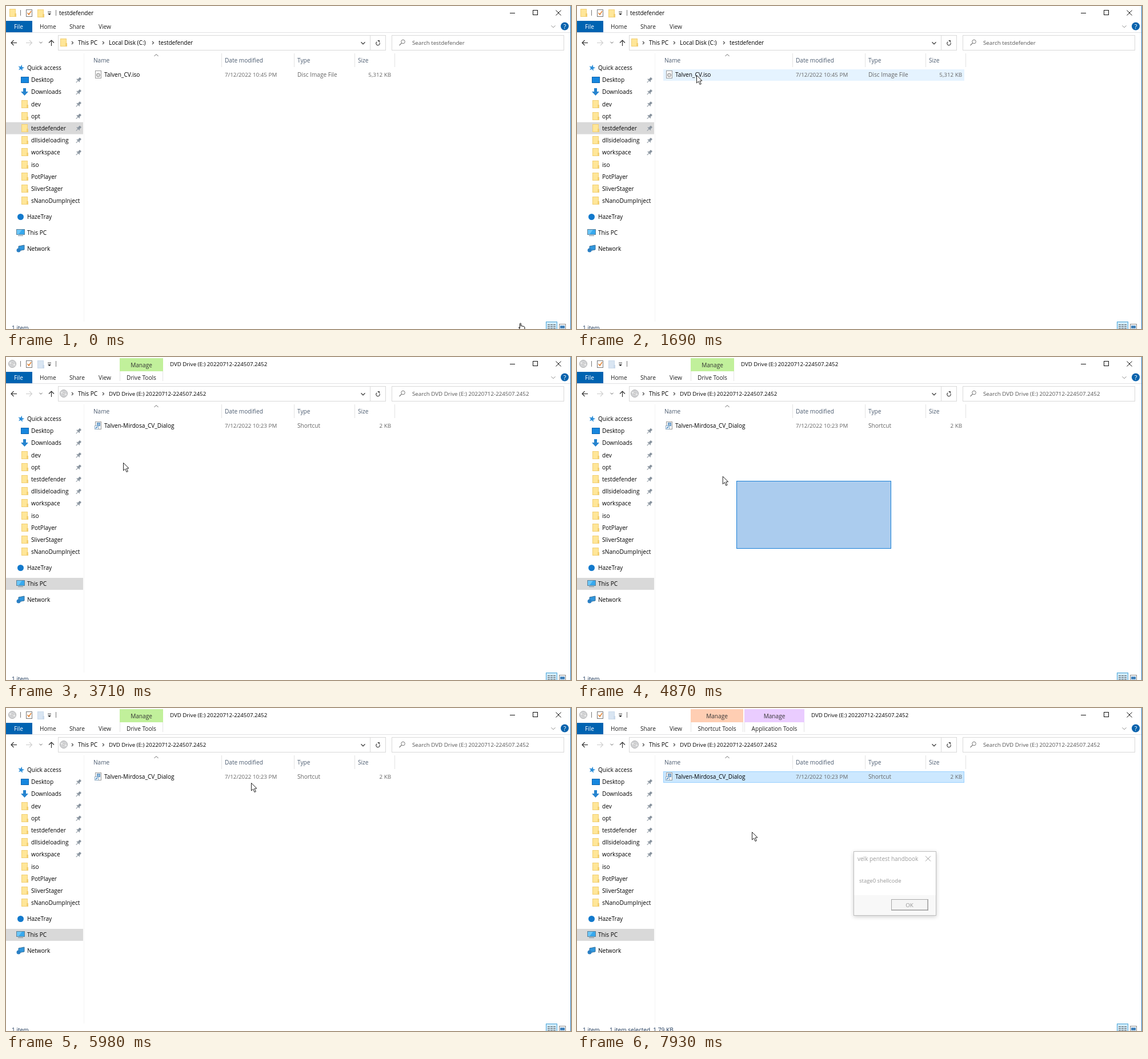
An HTML page with a canvas that plays this animation: 989 by 566 pixels, repeating every 8 s.

```html
<!DOCTYPE html>
<html lang="en">
<head>
<meta charset="utf-8">
<title>File explorer</title>
<style>
  html, body { margin: 0; width: 100%; height: 100%; overflow: hidden; background: #fff; }
  canvas { display: block; }
</style>
</head>
<body>
<canvas id="stage" width="989" height="566"></canvas>
<script>
const ctx = document.getElementById('stage').getContext('2d');
const LOOP = 8000;
const FONT = '"Open Sans", "Noto Sans", sans-serif';

// Pointer path: time, x, y
const path = [
  [0, 897, 555], [70, 897, 555], [250, 675, 378], [390, 675, 378], [540, 606, 241],
  [600, 603, 259], [760, 430, 370], [940, 316, 429], [1010, 288, 434], [1080, 276, 400],
  [1150, 280, 300], [1220, 280, 300], [1690, 209, 121], [2170, 212, 125], [2360, 212, 125],
  [2500, 216, 168], [2560, 216, 168], [2700, 208, 133], [2900, 208, 122], [3300, 208, 122],
  [3710, 205, 185], [4240, 205, 185], [4400, 569, 380], [4470, 550, 336], [4620, 385, 262],
  [4800, 279, 217], [4870, 255, 209], [5010, 214, 166], [5080, 214, 166], [5200, 185, 150],
  [5500, 585, 352], [5840, 450, 150], [5980, 429, 131], [6120, 424, 126], [6450, 424, 126],
  [6600, 340, 119], [6790, 251, 122], [7650, 251, 122], [7930, 306, 217], [8000, 306, 217]
];
const drags = [
  { from: 600, to: 1080, x: 603, y: 259 },
  { from: 4470, to: 4940, x: 550, y: 336 }
];
const within = (t, a, b) => t >= a && t < b;

function pointerAt(t) {
  const i = Math.max(1, path.findIndex(k => k[0] > t));
  const [t0, x0, y0] = path[i - 1], [t1, x1, y1] = path[i];
  const f = (t - t0) / (t1 - t0);
  return [x0 + (x1 - x0) * f, y0 + (y1 - y0) * f];
}

function text(s, x, y, color = '#000', size = 10.1, align = 'left') {
  ctx.font = `${size}px ${FONT}`;
  ctx.textAlign = align;
  ctx.fillStyle = color;
  ctx.fillText(s, x, y);
}
function rect(x, y, w, h, fill, stroke) {
  if (fill) { ctx.fillStyle = fill; ctx.fillRect(x, y, w, h); }
  if (stroke) {
    ctx.strokeStyle = stroke;
    ctx.lineWidth = 1;
    ctx.strokeRect(x + .5, y + .5, w - 1, h - 1);
  }
}
function line(points, color = '#444', width = 1) {
  ctx.beginPath();
  for (let i = 0; i < points.length; i += 2) ctx.lineTo(points[i], points[i + 1]);
  ctx.strokeStyle = color;
  ctx.lineWidth = width;
  ctx.stroke();
}
function poly(points, fill, stroke) {
  const p = new Path2D('M' + points + 'Z');
  ctx.fillStyle = fill;
  ctx.fill(p);
  if (stroke) { ctx.strokeStyle = stroke; ctx.lineWidth = 1; ctx.stroke(p); }
}
function circle(x, y, r, fill, stroke) {
  ctx.beginPath();
  ctx.arc(x, y, r, 0, 7);
  ctx.fillStyle = fill;
  ctx.fill();
  if (stroke) { ctx.strokeStyle = stroke; ctx.lineWidth = 1; ctx.stroke(); }
}
const down = (x, y, r, c, w) => line([x - r, y - r / 2, x, y + r / 2, x + r, y - r / 2], c, w);
const right = (x, y) => line([x - 1, y - 2.5, x + 1.5, y, x - 1, y + 2.5], '#444', 1.1);

function folder(x, y, pale) {
  const edge = pale ? '#c9d9ea' : '#f2cf73';
  rect(x, y, 11, 14, pale ? '#d9e5f2' : '#ffe698', edge);
  rect(x + 9, y + 8, 3, 6, edge);
}
function disc(x, y) {
  circle(x, y, 6.5, '#d2d3d5', '#b0b1b3');
  line([x - 5, y - 2, x + 5, y + 2], '#ececec', 2);
  circle(x, y, 1.5, '#f8f8f8', '#bbb');
}
function monitor(x, y) {
  rect(x, y, 15, 10, '#38a9ee', '#5b7f98');
  poly(`${x + 1} ${y + 1}h9l-6 8h-3`, '#6cc6f7');
  rect(x + 3, y + 11, 9, 1, '#6b8ba0');
}
function pin(x, y) {
  ctx.save();
  ctx.translate(x, y);
  ctx.rotate(Math.PI / 4);
  rect(-2, -5, 4, 5, '#87929d');
  rect(-3.5, 0, 7, 1.5, '#87929d');
  rect(-.5, 1, 1, 5, '#87929d');
  ctx.restore();
}
function star(x, y) {
  ctx.beginPath();
  for (let i = 0; i < 10; i++) {
    const r = i % 2 ? 2.4 : 5.8, a = i * Math.PI / 5 - 1.35;
    ctx.lineTo(x + r * Math.cos(a), y + r * Math.sin(a));
  }
  ctx.fillStyle = '#2d8fd9';
  ctx.fill();
}

function drawTitleBar(drive, tabs) {
  if (drive) disc(11, 12); else folder(6, 5);
  rect(25, 7, 1, 10, '#777');
  rect(35, 6, 11, 13, '#fff', '#777');
  line([37.5, 12, 40, 15, 44, 9], '#e07b28', 1.4);
  folder(55, 6, drive);
  rect(73, 10, 6, 1, '#333');
  poly('73 13L79 13L76 16', '#222');
  rect(87, 7, 1, 10, '#777');

  let x = 199;
  for (const [label, width, color] of tabs) {
    rect(x, 2, width, 23, color);
    line([x + .5, 25, x + .5, 42], '#e3e3e3');
    line([x + width - .5, 25, x + width - .5, 42], '#e3e3e3');
    text('Manage', x + width / 2, 18, '#333', 10.1, 'center');
    text(label, x + width / 2, 40, '#222', 10.1, 'center');
    x += width + 2;
  }
  const title = drive ? 'DVD Drive (E:) 20220712-224507.2452' : 'testdefender';
  text(title, tabs.length ? x + 10 : 93, 16, '#000', drive ? 9.7 : 10);

  rect(882, 12, 9, 1, '#111');
  rect(922, 7, 9, 9, null, '#111');
  line([962.5, 7.5, 971.5, 16.5], '#111');
  line([971.5, 7.5, 962.5, 16.5], '#111');

  rect(0, 46, 988, 1, '#e1e2e3');
  rect(0, 26, 46, 20, '#0063b1');
  text('File', 14, 40, '#fff');
  text('Home', 59, 40, '#222');
  text('Share', 111, 40, '#222');
  text('View', 162, 40, '#222');
  down(958, 36, 3.5, '#888');
  circle(978, 35.5, 7, '#0863ad');
  text('?', 978, 39.5, '#fff', 11, 'center');
}

function drawAddressBar(drive) {
  line([19, 64.5, 9.5, 64.5], '#333', 1.2);
  line([13.5, 60, 9, 64.5, 13.5, 69], '#333', 1.2);
  line([35, 64.5, 45, 64.5], '#d0d0d0', 1.2);
  line([41, 60, 45.5, 64.5, 41, 69], '#d0d0d0', 1.2);
  down(61, 64, 2.5, '#666');
  line([79.5, 70, 79.5, 60], '#333', 1.2);
  line([75, 64.5, 79.5, 60, 84, 64.5], '#333', 1.2);

  rect(91, 51, 574, 27, '#fff', '#d9d9d9');
  rect(637, 51, 1, 27, '#d9d9d9');
  if (drive) disc(101, 64); else folder(95, 57);
  right(116, 64.5);
  text('This PC', 126, 68);
  right(170, 64.5);
  if (drive) {
    text('DVD Drive (E:) 20220712-224507.2452', 180, 68, '#000', 9.7);
  } else {
    text('Local Disk (C:)', 180, 68);
    right(257, 64.5);
    text('testdefender', 267, 68, '#000', 10);
  }
  down(625, 65, 3.5, '#444', 1.3);
  ctx.beginPath();
  ctx.arc(651, 65.5, 3.2, -.4, 4.2);
  ctx.strokeStyle = '#444';
  ctx.lineWidth = 1.1;
  ctx.stroke();
  poly('650 60L654 60L654 64', '#444');

  rect(675, 51, 302, 27, '#fff', '#d9d9d9');
  circle(695, 62.5, 3.3, '#fff', '#777');
  line([692.5, 65, 688.5, 69], '#777', 1.1);
  text('Search ' + (drive ? 'DVD Drive (E:) 20220712-224507.2452' : 'testdefender'), 711, 68, '#555', 9.75);
}

function drawSidebar(drive) {
  rect(136, 83, 1, 470, '#f4f4f4');
  rect(0, drive ? 387 : 203.6, 135, 21, '#d9d9d9');
  star(26.5, 108.5);
  text('Quick access', 37, 112);
  const items = ['Desktop', 'Downloads', 'dev', 'opt', 'testdefender', 'dllsideloading',
    'workspace', 'iso', 'PotPlayer', 'SliverStager', 'sNanoDumpInject'];
  items.forEach((name, i) => {
    const y = 129.3 + i * 21.18, top = Math.round(y - 7);
    if (i === 0) rect(26, 124, 14, 11, '#1787df', '#0b62ad');
    else if (i === 1) poly('30 144L35 144L35 150L39 150L32.5 157L26 150L30 150', '#2684cf');
    else folder(27, top);
    text(name, 44, Math.round(y + 4), '#000', 10.15);
    if (i < 7) pin(127, y + .5);
  });
  circle(25.5, 369.5, 5.5, '#1279cc');
  text('HazeTray', 37, 373);
  monitor(18, 391);
  text('This PC', 37, 401);
  poly('22 421L32 419L32 427L22 429', '#2f96dd', '#3c7299');
  circle(22, 428, 3.5, '#2b7fc4');
  text('Network', 37, 429);
}

function drawFiles(drive, state) {
  const head = '#4c5c70';
  text('Name', 153, 99, head);
  text('Date modified', 383, 99, head);
  text('Type', 510, 99, head);
  text('Size', 616, 99, head);
  line([259.5, 88, 263, 84.5, 266.5, 88], '#666');
  for (const x of [377, 504, 610, 680]) rect(x, 83, 1, 24, '#e3e3e3');

  if (state === 'hover') rect(151, 111, 527, 20, '#e5f3ff');
  if (state === 'focus') rect(151, 111, 527, 20, '#fff', '#99c9ef');
  if (state === 'selected') rect(151, 111, 527, 20, '#cce8ff', '#99d1ff');

  rect(156, 113, 11, 14, '#fafafa', '#9a9a9a');
  if (drive) {
    rect(159, 115, 6, 6, '#8db6da', '#5c90bf');
    rect(155, 120, 7, 7, '#fff', '#8aa9c2');
    line([157, 125, 160, 122], '#1e6fb8', 1.3);
  } else circle(161.5, 121, 3, '#ddd', '#888');

  const dim = '#666';
  text(drive ? 'Talven-Mirdosa_CV_Dialog' : 'Talven_CV.iso', 172, 124);
  text(drive ? '7/12/2022 10:23 PM' : '7/12/2022 10:45 PM', 383, 124, dim, 9.8);
  text(drive ? 'Shortcut' : 'Disc Image File', 510, 124, dim);
  text(drive ? '2 KB' : '5,312 KB', 674, 124, dim, 9.8, 'right');
}

function drawStatus(drive, selected) {
  text('1 item', 10, 568, '#1e395b');
  if (selected) text('1 item selected  ' + (drive ? '1.79 KB' : '5.18 MB'), 57, 568, '#1e395b');
  rect(945, 553, 20, 16, '#cfeafa', '#4aa5d8');
  for (let y = 558; y < 566; y += 3)
    for (const x of [948, 953, 958]) rect(x, y, 4, 1, '#555');
  rect(968, 557, 12, 12, '#fff', '#888');
  rect(970, 560, 8, 5, '#4584bc');
}

function drawDialog(alpha) {
  ctx.save();
  ctx.shadowColor = `rgba(0,0,0,${alpha * .4})`;
  ctx.shadowBlur = 7;
  ctx.shadowOffsetY = 2;
  rect(484, 251, 145, 113, '#fff');
  ctx.shadowColor = 'transparent';
  ctx.globalAlpha = alpha;
  rect(484, 251, 145, 113, null, '#777');
  rect(485, 328, 143, 35, '#f0f0f0');
  text('velk pentest handbook', 491, 268, '#333', 10);
  line([610, 259.5, 619, 268.5], '#333');
  line([619, 259.5, 610, 268.5], '#333');
  text('stage0 shellcode', 494, 306, '#222', 9.5);
  rect(550, 335, 65, 20, '#f0f0f0', '#555');
  rect(551, 353, 63, 1, '#777');
  rect(613, 336, 1, 18, '#777');
  text('OK', 582, 348.5, '#333', 9.8, 'center');
  ctx.restore();
}

function drawPointer(t) {
  const [x, y] = pointerAt(t);
  ctx.save();
  ctx.translate(x, y);
  if (t < 70) {
    poly('2.5 1.5Q3.5 0 4.5 1.5L4.5 5.5L9.5 6.5Q11.5 7 11 10L10 14L5 14L.5 8.5L2.5 9', '#fff', '#000');
  } else {
    poly('.5 .5L.5 14L3.7 11L6 16.5L8.3 15.5L6 10.2L10 10', '#fff', '#222');
  }
  ctx.restore();
}

function render(t) {
  const drive = t >= 3370;
  const selected = within(t, 1830, 2500) || within(t, 2970, 3370) || t >= 6120;
  const hover = within(t, 1620, 1830) || within(t, 2800, 2970) || within(t, 6050, 6120);
  const state = selected ? 'selected' : hover ? 'hover' : within(t, 2500, 2800) ? 'focus' : '';
  const purple = '#eaccff';
  const tabs = !drive ? (selected ? [['Disc Image Tools', 103, purple]] : [])
    : selected ? [['Shortcut Tools', 92, '#ffceb3'], ['Application Tools', 105, purple]]
    : [['Drive Tools', 76, '#c1f09b']];

  rect(0, 0, 989, 566, '#fff');
  drawTitleBar(drive, tabs);
  drawAddressBar(drive);
  drawSidebar(drive);
  drawFiles(drive, state);
  drawStatus(drive, selected);
  rect(988, 0, 1, 566, '#2678bd');

  // The selection box trails the pointer slightly
  const drag = drags.find(d => within(t, d.from, d.to));
  if (drag) {
    const [x, y] = pointerAt(Math.max(drag.from, t - 70)).map(Math.round);
    rect(Math.min(x, drag.x), Math.min(y, drag.y),
      Math.abs(x - drag.x), Math.abs(y - drag.y), '#abccee', '#1a80d6');
  }
  if (t >= 7790) drawDialog(Math.min(.48, (t - 7790) / 290));
  drawPointer(t);
}

function tick() {
  render(performance.now() % LOOP);
  requestAnimationFrame(tick);
}
tick();
</script>
</body>
</html>
```
